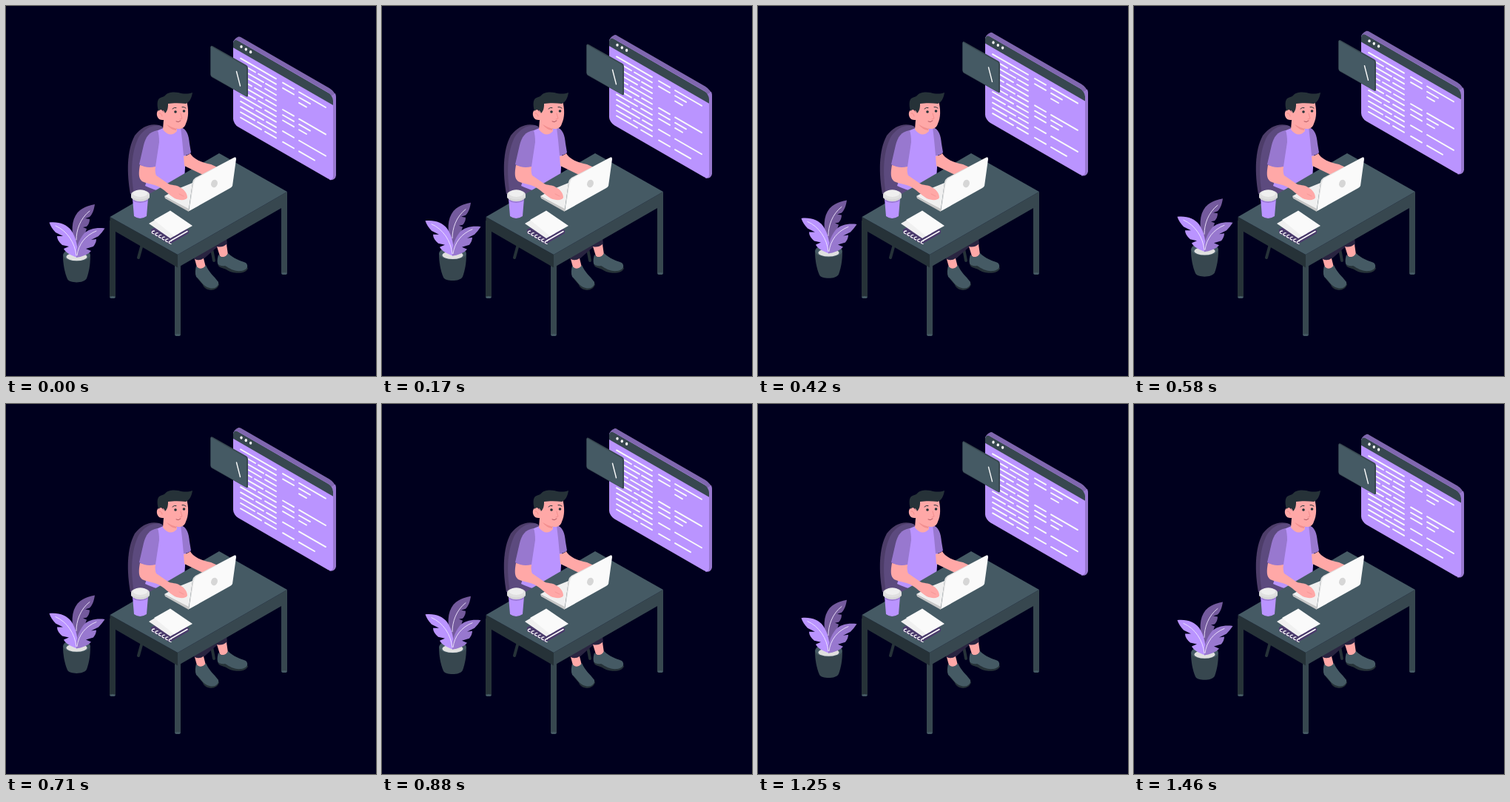
An HTML page with a canvas that plays this animation: 500 px wide and 500 px high, repeating every 1500 ms.

```html
<!DOCTYPE html>
<html lang="en">
<head>
<meta charset="utf-8">
<title>Working at a desk</title>
<style>
  html, body { margin: 0; width: 100%; height: 100%; overflow: hidden; background: #00001e; }
  canvas { display: block; width: 500px; height: 500px; }
</style>
</head>
<body>
<canvas id="stage" width="500" height="500"></canvas>
<script>
const ctx = document.getElementById('stage').getContext('2d');
const LOOP = 1500;
const LIFT = 10;
const ISO = 0.577;
const C = {
  night: '#00001e', slate: '#455a64', steel: '#37474f', ink: '#263238',
  lilac: '#ba94ff', mauve: '#9878cf', plum: '#8067af', deep: '#5c4a7e',
  skin: '#ffa8a7', blush: '#f28f8f', white: '#fafafa', pale: '#e0e0e0', grey: '#c7c7c7'
};

function fill(color, path) {
  ctx.fillStyle = color;
  ctx.fill(new Path2D(path));
}

function stroke(color, width, path) {
  ctx.strokeStyle = color;
  ctx.lineWidth = width;
  ctx.lineCap = ctx.lineJoin = 'round';
  ctx.stroke(new Path2D(path));
}

function oval(color, x, y, rx, ry = rx, turn = 0) {
  ctx.fillStyle = color;
  ctx.beginPath();
  ctx.ellipse(x, y, rx, ry, turn, 0, Math.PI * 2);
  ctx.fill();
}

function drawChair() {
  stroke(C.ink, 4, 'M184 322L179 340M278 328L281 344');
  fill('#4d3d69', 'M168 254C163 226 163 195 174 175C183 163 195 158 207 161L216 168V252Z');
  fill(C.deep, 'M173 254C168 226 169 196 180 176C188 165 198 160 210 162L216 168V254Z');
}

function drawLegs() {
  fill('#292440', 'M254 337L298 312L299 323Q292 328 285 326L268 341Q260 345 254 342Z');
  fill(C.skin, 'M255 342Q261 345 267 341L270 353Q263 359 258 353Z');
  fill(C.skin, 'M285 325Q292 327 298 322L300 336Q294 342 289 338Z');
  fill(C.ink, 'M256 359C256 369 265 373 267 379C272 386 285 386 288 376L282 368Z');
  fill(C.slate, 'M257 351C260 356 267 356 270 350C274 360 282 366 287 373C288 379 282 383 275 381C266 379 264 371 257 366C255 361 256 356 257 351Z');
  fill(C.ink, 'M286 347C286 355 294 353 299 357C306 362 325 363 327 354L318 348Z');
  fill(C.slate, 'M287 336C291 341 297 340 300 334C307 341 316 344 324 347C329 352 325 357 318 358C308 359 303 355 296 351C291 352 287 350 286 348C285 344 286 340 287 336Z');
}

function drawTorso() {
  fill(C.lilac, 'M203 169L215 164Q224 173 234 163L242 168C246 178 242 212 241 238L214 252Q198 248 188 243Q189 236 201 225Z');
  fill(C.mauve, 'M236 164C244 166 247 174 248 186L250 198Q246 202 240 202L238 181Z');
  fill(C.skin, 'M213 154L212 167Q222 179 231 169L230 160Z');
  fill(C.blush, 'M217 160Q222 167 230 168V164Z');
}

function drawHead() {
  fill(C.skin, 'M211 138C213 130 224 128 244 128C247 140 247 151 243 159C241 167 233 167 228 165C221 163 215 159 213 154C206 155 203 149 204 144C206 138 211 139 213 144Z');
  stroke(C.blush, 1, 'M207 145Q210 144 211 149M236 145L238 152L235 153');
  fill(C.ink, 'M206 142C204 134 204 128 207 125C210 123 213 123 215 121C219 116 227 116 233 117C240 119 246 119 252 117C251 124 248 130 243 132C235 131 226 131 219 132C219 136 219 141 215 145C213 139 209 139 206 142Z');
  oval(C.ink, 229, 143, 1.8);
  oval(C.ink, 240.5, 142, 1.8);
  stroke(C.ink, 1, 'M225 139Q227 136.500 230 137.500M238 136.500Q241 136 243 138');
  stroke('#a94e59', .9, 'M230 156Q233 158 236 155');
}

function drawLeg(x, top, bottom, color) {
  fill(color, `M${x} ${top}h8V${bottom - 2}q-4 4 -8 0Z`);
  oval(C.slate, x + 4, bottom - 1.5, 3.8, 1.5);
}

function drawDesk() {
  drawLeg(140, 290, 395, C.ink);
  drawLeg(228, 345, 446, C.steel);
  drawLeg(372, 262, 363, C.steel);
  fill(C.ink, 'M140.500 285L232 336V353.500L140.500 300.500Z');
  fill(C.steel, 'M232 336L380 251V268.500L232 353.500Z');
  fill(C.slate, 'M140.500 285L288 199L380 251L232 336Z');
}

function drawLaptopAndArms() {
  fill(C.skin, 'M240 203Q246 202 249 199C252 206 265 212 277 214Q283 216 287 220L270 230L241 216Z');
  fill('#f0f0f0', 'M214 257L230 248L252 239L247 275Z');
  fill(C.grey, 'M214 257L247 274V278L215 260Z');
  fill(C.skin, 'M181 215C179 226 179 233 184 237C190 240 200 241 206 244C214 248 220 255 228 260C235 263 243 263 245 259C245 253 241 248 235 245C230 241 224 243 219 240L203 229Q201 225 202 217Z');
  stroke(C.blush, .7, 'M234 254L240 257');
  fill(C.mauve, 'M205 168C193 170 189 177 186 188L180 214Q190 220 202 217L207 184Q207 174 205 168Z');
  fill(C.pale, 'M247 277L252 238Q253 234 256 232L308 205L260 270Z');
  fill(C.white, 'M247.500 277L254 238Q255 235 257 233L308 205Q311 203 311 207L306 243Q305 245 303 246Z');
  oval('#d6d6d6', 281.5, 240, 4.3, 5.4, 0.35);
}

function drawCup() {
  fill(C.lilac, 'M171 260L173 284Q181 290 190 284L192 260Z');
  fill(C.mauve, 'M171 261Q181 268 192 261V263Q181 269 171 263Z');
  fill('#d6d6d6', 'M169 255V259Q173 264 181.500 264Q190 264 194 259V255Z');
  oval(C.pale, 181.5, 255, 12.5, 6.4);
  oval('#efefef', 181.5, 253.3, 9.8, 4.7);
}

function drawNotebook() {
  fill('#4a3a6c', 'M196 302L222 288L247 303V307L221 322L196 307Z');
  stroke(C.white, 1.6, 'M223 317L245 304.500');
  for (let i = 0; i < 6; i++) {
    const x = 197.5 + i * 4.6, y = 305 + i * 2.7;
    stroke(C.white, 1.3, `M${x + 3} ${y - 1}Q${x - 1} ${y - 1} ${x} ${y + 2}l2.500 1`);
  }
  fill('#f0f0f0', 'M193 294L210 284L234 307L222 314Z');
  fill(C.white, 'M200 289L222 276.500L252 297L227 311Z');
}

function drawPlant() {
  fill(C.steel, 'M77 337C77 325 114 325 114 337C114 350 112 360 109 368C106 375 86 375 83 369C79 360 77 348 77 337Z');
  oval(C.slate, 95.5, 337, 18, 8);
  oval(C.pale, 95.5, 339, 14, 5.2);
  fill('#745a9d', 'M92 318C87 300 90 284 100 276C107 271 114 269 120 268C119 275 117 281 113 285L107 287L113 288Q113 294 109 298L104 299L109 301Q107 309 101 315L96 328Z');
  fill(C.lilac, 'M58.500 292.500C71 291 82 295 88 303C95 313 98 327 96 340C88 337 80 333 78 328L85 325L76 323Q69 317 69 311L77 311L67 306C63 302 60 297 58.500 292.500Z');
  fill(C.mauve, 'M133.500 300.500C123 299 111 301 105 308C98 317 94 328 95 340C102 339 111 336 115 331L108 328L118 325Q122 320 122 315L115 316L125 311Q130 306 133.500 300.500Z');
  stroke('#f1e8ff', .9, 'M67 297C83 304 93 320 95 337M113 277C100 287 95 303 95 316M122 304C107 310 98 322 96 337');
}

// Each entry: row, then start/end pairs measured along the window's slope.
const textRows = [
  [0, 10, 58, 67, 82, 89, 125],
  [1, 10, 30, 34, 58, 67, 82, 89, 104],
  [2, 10, 41, 44, 58, 89, 99],
  [3, 10, 38, 43, 58],
  [4, 10, 25, 29, 58],
  [5, 10, 40, 44, 58, 67, 82, 89, 125],
  [6, 10, 30, 34, 58, 67, 82, 89, 104],
  [7, 10, 38, 43, 58, 67, 82, 89, 99],
  [8, 10, 27, 31, 58],
  [9, 10, 41, 45, 58, 67, 82, 89, 125],
  [10, 10, 29, 33, 58],
  [11, 10, 38, 43, 58, 67, 82, 89, 110]
];

function drawWindow() {
  fill(C.plum, 'M307 50Q307 45 314 41.500Q316 41 318 42.500L437 111Q445 116 446 124L438 140L308 60Z');
  fill(C.mauve, 'M439 122L445 118Q446 121 446 124V229Q445 236 437 235Z');

  ctx.save();
  ctx.transform(1, ISO, 0, 1, 307, 47);
  ctx.beginPath();
  ctx.roundRect(0, -4, 135, 116.5, 7);
  ctx.fillStyle = C.lilac;
  ctx.fill();
  ctx.clip();
  ctx.fillStyle = C.steel;
  ctx.fillRect(0, -4, 135, 13.2);
  ctx.restore();

  for (let i = 0; i < 3; i++) oval(C.white, 318 + i * 6.3, 55 + i * 3.6, 1.7, 2.1);
  for (const [row, ...spans] of textRows) {
    const y = 64.9 + row * 7.28;
    for (let i = 0; i < spans.length; i += 2) {
      const [a, b] = [spans[i], spans[i + 1]];
      stroke(C.white, 1.9, `M${307 + a} ${y + a * ISO}L${307 + b} ${y + b * ISO}`);
    }
  }
}

function drawPanel() {
  fill(C.steel, 'M276.500 55Q277 53 279 54L325 80Q327 81 327 84V121Q327 124 324 122L278 96Q276.500 95 276.500 93Z');
  fill(C.slate, 'M276.500 56Q276.500 54 278 55L323 81Q325 82 325 84V120Q325 122 323 121L278 95Q276.500 94 276.500 92Z');
  stroke(C.white, 1.4, 'M311.500 88.500L316.500 108');
}

function floating(lift, ...parts) {
  ctx.save();
  ctx.translate(0, -lift);
  parts.forEach(draw => draw());
  ctx.restore();
}

function render(now) {
  const phase = (now % LOOP) / LOOP;
  const lift = LIFT * (1 - Math.abs(1 - 2 * phase));
  ctx.fillStyle = C.night;
  ctx.fillRect(0, 0, 500, 500);
  [drawChair, drawLegs, drawTorso, drawHead, drawDesk,
    drawLaptopAndArms, drawCup, drawNotebook].forEach(draw => draw());
  floating(lift, drawPlant, drawWindow, drawPanel);
}

let start;
function tick(now) {
  start ??= now;
  render(now - start);
  requestAnimationFrame(tick);
}
render(0);
requestAnimationFrame(tick);
</script>
</body>
</html>
```
